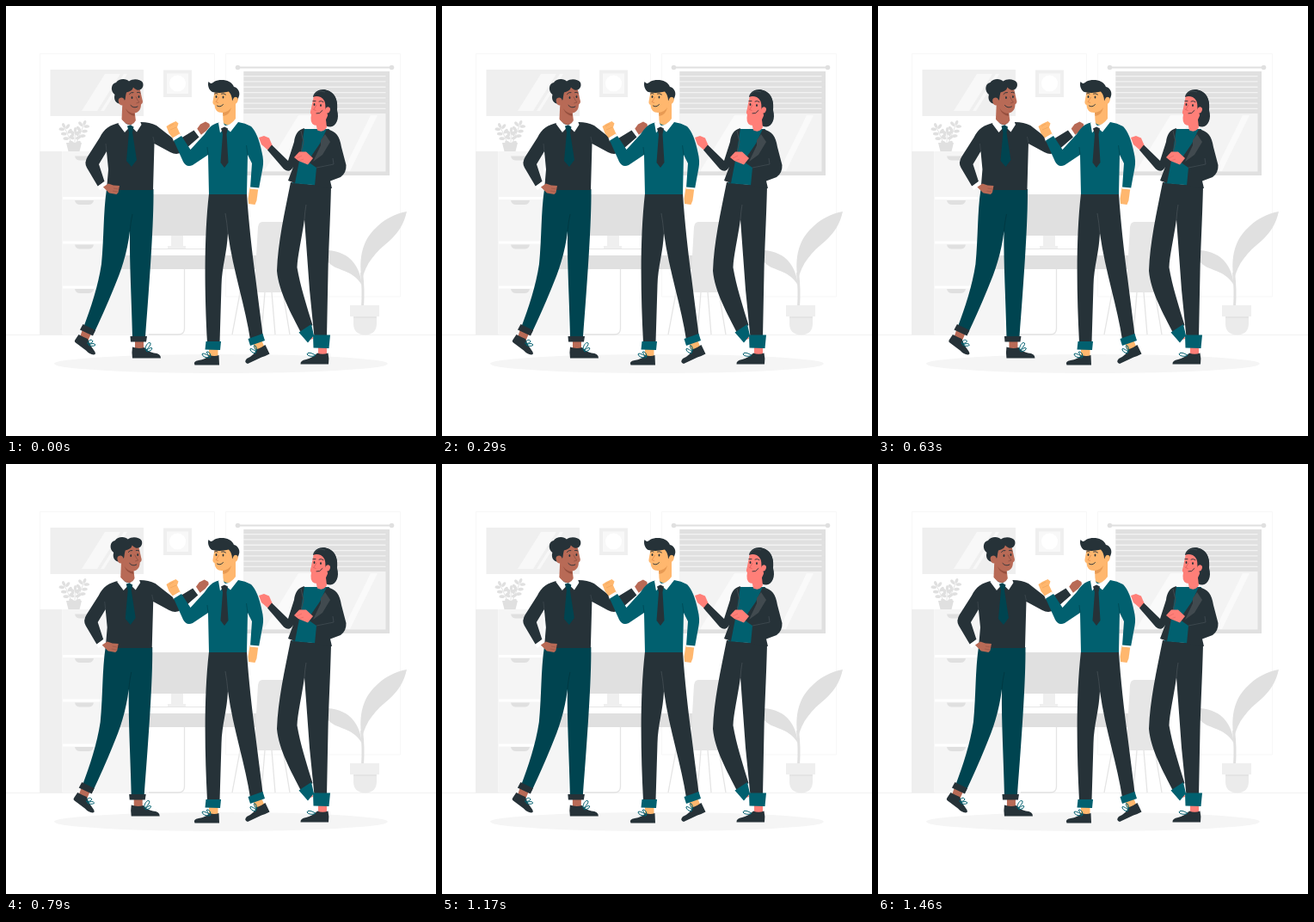
An HTML page that plays this animation: 500x500 px, repeating every 1.5 s.

```html
<!DOCTYPE html>
<html lang="en">
<head>
<meta charset="utf-8">
<title>Colleagues</title>
<style>
html, body { margin: 0; width: 100%; height: 100%; overflow: hidden; background: #fff; }
svg { display: block; width: 100%; height: 100%; }
.dark { fill: #263238; }
.teal { fill: #01606f; }
.deep { fill: #004450; }
.white { fill: #fff; }
.brown { fill: #b86a56; }
.tan { fill: #ffb76e; }
.pink { fill: #ff7f78; }
.g1 { fill: #f5f5f5; }
.g2 { fill: #efefef; }
.g3 { fill: #e0e0e0; }
.line { fill: none; stroke: #263238; stroke-width: .9; stroke-linecap: round; stroke-linejoin: round; }
.lace { fill: none; stroke: #01606f; stroke-width: 1; stroke-linejoin: round; }
.thin { fill: none; stroke: #e4e4e4; stroke-width: 1.3; }
.wall { fill: none; stroke: #f7f7f7; }
</style>
</head>
<body>
<svg viewBox="0 0 500 500">
  <g id="room">
    <path class="wall" d="M39.500 55.500H242.500V382H39.500ZM255.500 55.500H458.500V338H255.500Z"/>
    <path d="M0 382.500H500" stroke="#efefef" stroke-width=".8"/>

    <path class="g2" d="M51.500 74H160V128H51.500Z"/>
    <path fill="#f8f8f8" d="M88 122 115 79H133L106 122ZM110 122 137 79H141L114 122Z"/>
    <path class="g2" d="M183 74.500H216V106H183Z"/>
    <path fill="#f8f8f8" d="M187 78.500H212V102H187Z"/>
    <circle class="white" cx="199.500" cy="90" r="9.500"/>

    <g id="sprigs" class="g3"></g>
    <path class="g3" d="M70 159H88L85.500 169H72.500Z"/>
    <path class="g2" d="M39 169H65.500V382.500H39Z"/>
    <path class="g1" d="M66 169H118V382.500H66ZM118 306H147V382.500H118Z"/>
    <path d="M66 223.500H118M66 275H118M66 327H118" stroke="#fff" stroke-width="3"/>
    <g id="handles" class="g3"></g>

    <path class="g3" d="M160 219H236V267H160Z"/>
    <path class="g2" d="M192 267H206V279H209V282H188V279H192Z"/>
    <path d="M165 282.500H232" stroke="#e6e6e6" stroke-width="1"/>
    <path class="g3" d="M118 290H292V306H118Z"/>
    <path class="thin" d="M207.500 306V375Q207.500 382 200 382H166"/>
    <path fill="#e6e6e6" d="M298 251H330V333H295Q287 333 289 324L293 257Q294 251 298 251Z"/>
    <path class="thin" d="M277 307 263 382M301 333 297 382M309 333 313 382M322 333 330 382"/>

    <path fill="#f3f3f3" d="M276 76H446V197H276Z"/>
    <path class="g3" d="M441.500 76H446V197H276V192.500H441.500Z"/>
    <path fill="#fafafa" d="M300 192 340 127H367L327 192ZM392 192 424 127H432L400 192Z"/>
    <g id="blinds" class="g3"></g>
    <path d="M270 71.500H448" stroke="#e0e0e0" stroke-width="2"/>
    <circle class="g3" cx="269.500" cy="71.500" r="2.800"/>
    <circle class="g3" cx="448.500" cy="71.500" r="2.800"/>

    <path class="g3" d="M414 319C410 297 413 276 427 261 439 248 453 241 466 239 463 253 456 264 446 273 430 286 418 299 414 319Z"/>
    <path class="g3" d="M414 325C412 305 402 286 374 284V297C383 309 403 305 414 325Z"/>
    <path d="M414.500 350Q416 330 413.500 310" fill="none" stroke="#e0e0e0" stroke-width="3"/>
    <path class="g2" d="M400 348H434V361H400Z"/>
    <path fill="#ebebeb" d="M404 361H431V369Q431 382 417.500 382.500 404 382 404 369Z"/>
    <path class="g3" d="M404 361H431V363H404Z" opacity=".6"/>
    <ellipse cx="250" cy="416" rx="194" ry="11" fill="#f5f5f5"/>
  </g>

  <g id="mover">
    <path class="brown" d="M89 376 99 381 95 390 86 385Z"/>
    <path class="dark" d="M84.500 382Q90 385 95 387 97 394 102 400 106 405 102 405.500 97 405 93 400.500L81 391.500Q79 390 80.500 388Z"/>
    <path class="lace" d="M95 392C96 388 100 387 101 390Q101 392 95 393ZM96 394Q102 391 104 394 103 396 97 395Z"/>
    <path class="brown" d="M150 388H160V399H150Z"/>
    <path class="dark" d="M147 396.500Q154 399 161 397 165 402 172 403.500 180 404 180 409.500H147Q146 402 147 396.500Z"/>
    <path class="lace" d="M162 400C162 394 166 390 168 392Q169 394 163 400ZM163 401Q168 396 170 398 170 401 164 402Z"/>

    <path class="deep" d="M117 213H171.500C172 250 167 320 162 385H147C146 340 143.500 300 144 262 141 287 134 308 125 329 118 346 110 364 102.500 380L90 374C99 350 107 326 111 300 114 270 113 240 117 213Z"/>
    <path d="M144 262Q145 251 147 242" fill="none" stroke="#00343d" stroke-width=".7"/>
    <path class="dark" d="M89.500 370 104 377 101 383.500 86 376.500ZM144.500 384H164L163 390.500H145Z"/>

    <path class="brown" d="M222 143 226 137.500 232 134.500 236.500 137 237 140 233 145 226 150.500Z"/>
    <path class="white" d="M218 145 221.500 141.500 227 150 223.500 153Z"/>
    <path class="dark" d="M134 135.500C120 138 114 143 109 153L95 175Q90.500 182 94 188L107 210 114.500 204 108 184 117 169 119 190 117 214H171L172.500 160 191 170Q199 174 205 169.500L224.500 152.500 218.500 144.500 198 157 175 139Q167 135 157 135Z"/>
    <path d="M117 169 116 160M172.500 159 171 152" stroke="#455056" stroke-width=".6"/>
    <path class="white" d="M106 210 114.500 204 117 207.500 109 214Z"/>
    <path class="brown" d="M113 210.500 119 206.500 125 208.500 132 209 130.500 217 128.500 219 120 217.500Z"/>
    <path d="M125 212 131 213M124 215 130 216" stroke="#8c4e42" stroke-width=".5"/>

    <path class="brown" d="M135.500 110 134.500 132Q144 143 151 134L149.500 122Z"/>
    <path class="white" d="M134 131.500Q139 138 145 138.500 149 137 151 133L156 134 157.500 138 152 146.500 145 139.500 138 147 130.500 137Z"/>
    <path class="deep" d="M141 139.500 145 138.500 148.500 140.500 147 147 152 179 146 187 140 180 143 147Z"/>
    <path class="brown" d="M136 98C141 93 152 92 155.500 96 157 102 158 107 159 111Q159 114 157 114.500C157 122 152 125.500 146 124.500Q138 123 135 112Z"/>
    <path d="M139 119Q143 125 149.500 125L149.500 128Q142 127 139 119Z" fill="#96503f"/>
    <path class="dark" d="M133.500 114C127 113.500 125 108 126.500 103 121 99 122 90 128 89 131 84 140 84 143 87.500 148 84 156 85 159 89 161 94 157 99 152 97.500Q149 96 148 94.500 147 99 140 100.500 139 104 138.500 109Z"/>
    <ellipse class="brown" cx="134.500" cy="111" rx="3.600" ry="4.500" transform="rotate(-20 134.500 111)"/>
    <ellipse class="dark" cx="146.500" cy="106.500" rx=".9" ry="1.500"/>
    <ellipse class="dark" cx="154.500" cy="105.500" rx=".9" ry="1.500"/>
    <path class="line" d="M143.500 102.500Q145 100 148 100.500M152.500 100.500Q154 99.500 156 101"/>
    <path d="M151 105.500Q153 110 155 112L151.500 113" fill="none" stroke="#8c4e42" stroke-width=".8"/>
    <path class="line" d="M145 115.500Q148.500 119.500 153 117"/>
  </g>

  <g id="middle">
    <path class="tan" d="M236 397H246.500V409H236ZM287 391 297 388 301 398 291 402Z"/>
    <path class="dark" d="M237 406Q242 408 247.500 406L248 417.500H219.500Q217 413 224 412 232 411 237 406ZM291 399.500Q296 398 301.500 394L306.500 404.500Q302 407 297 408.500L281 416Q276 414 280 410 289 406 291 399.500Z"/>
    <path class="lace" d="M238 408Q228 402 228 405 229 409 237 409ZM237 408Q231 401 235 402 238 403 238 408ZM291 402Q283 396 284 400 285 403 290 404ZM291 401Q286 393 290 395 292 398 291.500 401Z"/>
    <path class="dark" d="M236 218H280C282 250 286 285 290 315L298.500 382 284 388C279 352 264 308 258 264 257 287 251 303 250.500 325L248.500 391H234C231 335 230 270 236 218Z"/>
    <path d="M258 264Q257 252 255 241" fill="none" stroke="#49545a" stroke-width=".7"/>
    <path class="teal" d="M232.500 390H250L249 400 231.500 399.500ZM281.500 387 298.500 381 301 389 284 395Z"/>

    <path class="tan" d="M283.500 211H293.500L291.500 226 289.500 231 282 230 281.500 224Z"/>
    <path class="tan" d="M186.500 140 191 137 197.500 134 200.500 136.500 199 141 203 150 195 155 189.500 148Z"/>
    <path d="M190 140 195 137M191 144 198 141" stroke="#e79a53" stroke-width=".5"/>
    <path class="white" d="M193.500 153.500 202 148.500 204 152 195 157.500Z"/>
    <path class="teal" d="M248 135.500C239 137 235 143 231 149L214.500 167 204 151 195 156.500 206 181Q210 188.500 217 185L235 173 236 219H280L281 173 286 183 284 211.500 294 212.500 298.500 188Q300 180 297.500 170 293 148 285 140 278 136 270 135Z"/>
    <path d="M281 173 279.500 162M235 173 234 164" stroke="#00444f" stroke-width=".7"/>
    <path class="white" d="M284 210.500 294.500 211.500 294 213.500 283.500 212.500Z"/>
    <path class="tan" d="M252 117 267 109 267 132Q260 142 252.500 136Z"/>
    <path class="white" d="M252 132Q253 138 255 139 262 138 267 131L270 135 261 146.500 254.500 141 249 147.500 247 136Z"/>
    <path class="dark" d="M250 142.500 254 140.500 258 142.500 256.500 149 258.500 182 254 188 249.500 182 252 149Z"/>
    <path class="tan" d="M243 97C247 94 258 93 266 98L267 110C265 119 259 124 251 124Q243 124 242.500 115 240 114 240.500 111Z"/>
    <path d="M252 124Q259 123 262 118 260 127 252.500 128Z" fill="#e79a53"/>
    <path class="dark" d="M240 100C236 98 234 92 235.500 88 238 91 240 90 242 88 250 84 262 86 265 94 270 95 273 101 270.500 106L268 112 263 110Q263 104 259 99.500 249 102 240 100Z"/>
    <ellipse class="tan" cx="266.500" cy="110" rx="3" ry="4.200" transform="rotate(20 266.500 110)"/>
    <ellipse class="dark" cx="252.500" cy="106" rx=".9" ry="1.500"/>
    <ellipse class="dark" cx="244.500" cy="105.500" rx=".9" ry="1.500"/>
    <path class="line" d="M250.500 102Q253 101 255.500 103M242.500 102Q244 101 246 102"/>
    <path d="M247.500 106Q246 109 244 111.500L247 112.500" fill="none" stroke="#e08a4b" stroke-width=".8"/>
    <path class="line" d="M245.500 116Q249 118.500 252.500 114.500"/>
  </g>

  <g id="right">
    <path class="pink" d="M363 395H373V408H363ZM343 376 354 372 357 387 350 389Z"/>
    <path class="dark" d="M362 403.500Q368 406 374.500 403.500 376 410 375 416.500H342.500Q342 412 349 411 357 409 362 403.500Z"/>
    <path class="lace" d="M360 406Q351 401 350 405 352 408 359 407Z"/>
    <path class="dark" d="M331 205 378 210C377 250 375 285 374.500 310L373 385H358.500L353 330 347 248C344 270 339 290 338.500 304 342 325 350 350 356.500 371L343 380C332 358 317 332 315 308 316 275 324 240 331 205Z"/>
    <path d="M347 248Q347.500 239 349 231" fill="none" stroke="#49545a" stroke-width=".7"/>
    <path class="teal" d="M340.500 379.500 355 370 358 383 351 391.500ZM357 382.500H377L375.500 398 357.500 397.500Z"/>

    <path class="pink" d="M294 153 300 151 306 153.500 310 163 304.500 167.500 297 161Z"/>
    <path class="teal" d="M345 143H376L363 208.500 333 206Z"/>
    <path class="dark" d="M347 142C339 144 336 150 335 158L328 180 309 161.500 304 167.500 323 189.500Q330 195 334 187L328 203 336 206 342 175Z"/>
    <path class="dark" d="M373 143C384 146 388 151 390 164L395.500 185Q396 194 389 199L377 203.500 379 212 359 209 361 188 351 181 356 173 365 160Z"/>
    <path d="M366 156 371 149 377 158 368 173 357 181 366 162Z" fill="#414a4f"/>
    <path d="M342 175 346 158 343 145" fill="none" stroke="#414a4f" stroke-width="1"/>
    <path d="M361 188 381 184 380 177" fill="none" stroke="#455056" stroke-width=".7"/>
    <path class="pink" d="M335 176 341 169.500 349 169.500 357 177 351 184.500 340 180Z"/>
    <path d="M338 177 344 174M341 180 346 178" stroke="#d95f5c" stroke-width=".5"/>

    <path class="dark" d="M359 106C359 98 368 95 376 99 384 103 386 112 385 121 388 131 384 140 377 140.500 370 140 368 136 369 130Z"/>
    <path class="pink" d="M359 130 371 124 373 141Q369 148 362 144.500Z"/>
    <path class="pink" d="M358 104C364 100 371 104 373 110L374.500 119C376 128 371 137 362 139Q354 139 354.500 130L355 126Q353 125 354.500 121Z"/>
    <path class="dark" d="M357 106C358 98 368 95 376 99 385 104 386 114 384.500 122L378 130Q372 126 371.500 119 372 109 366 106 361 104 357 106Z"/>
    <path d="M358 104Q362 97 371 100" fill="none" stroke="#49545a" stroke-width=".6"/>
    <ellipse class="pink" cx="374" cy="121" rx="2.800" ry="3.800" transform="rotate(20 374 121)"/>
    <ellipse class="dark" cx="366" cy="115.500" rx=".9" ry="1.500"/>
    <ellipse class="dark" cx="358.500" cy="114.500" rx=".9" ry="1.500"/>
    <path class="line" d="M364 111Q366 109.500 369 111.500M357 110.500 360 110.500M361 125Q365 126 368 121.500"/>
    <path d="M361 115Q359 119 357.500 120.500L360.500 121.500" fill="none" stroke="#d95f5c" stroke-width=".8"/>
  </g>
</svg>
<script>
const $ = id => document.getElementById(id);
const rows = (n, make) => Array.from({ length: n }, (_, i) => make(i)).join('');

$('blinds').innerHTML = rows(8, i =>
  `<path d="M276.500 ${76 + i * 6.3}h169.500v5h-169.500z"/>`);
$('handles').innerHTML = rows(4, i =>
  `<path d="M80 ${174.5 + i * 51.5}h22q-1 5-6 5h-10q-5 0-6-5z"/>`);

// Three leafy stems, each with paired leaves and a tip.
$('sprigs').innerHTML = [[76, -24, 22], [80, 2, 15], [82, 22, 25]].map(([x, turn, len]) =>
  `<g transform="translate(${x} 159) rotate(${turn})">
    <path d="M0 0V${-len}" stroke="#e0e0e0" stroke-width=".8"/>
    ${rows(3, i => [-1, 1].map(s => {
      const y = 3 - len + i * 6;
      return `<ellipse cx="${s * 3.8}" cy="${y}" rx="3.300" ry="1.800" transform="rotate(${s * -28} ${s * 3.8} ${y})"/>`;
    }).join(''))}
    <ellipse cy="${-len}" rx="1.700" ry="3"/>
  </g>`).join('');

const LOOP = 1500;
const shake = [0, -1, 2, -4, 4, -4, 4, -4, 2, -1, 0];
const curve = (s, a, b) => 3 * (1 - s) ** 2 * s * a + 3 * (1 - s) * s * s * b + s ** 3;

function ease(x) {
  let lo = 0, hi = 1;
  for (let i = 0; i < 24; i++) {
    const mid = (lo + hi) / 2;
    if (curve(mid, .36, .25) < x) lo = mid; else hi = mid;
  }
  return curve(lo, .07, 1);
}

function draw(now) {
  const p = (now % LOOP) / LOOP * 10;
  const i = Math.floor(p);
  const x = shake[i] + (shake[i + 1] - shake[i]) * ease(p - i);
  $('mover').setAttribute('transform', `translate(${x.toFixed(3)} 0)`);
}

function tick() {
  draw(performance.now());
  requestAnimationFrame(tick);
}
tick();
</script>
</body>
</html>
```
